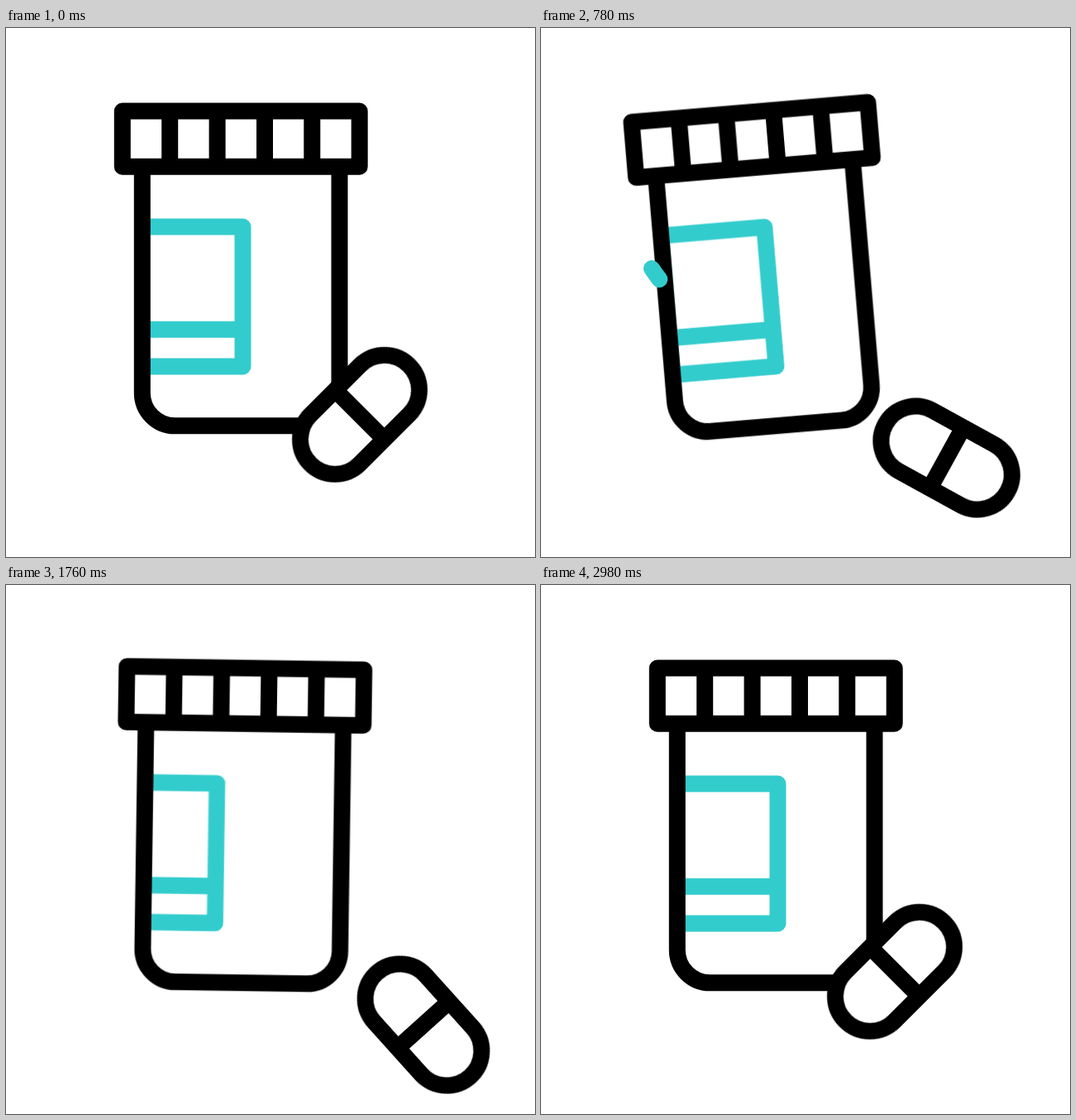
Recreate the animation shown at these times as an HTML page. Size 640 by 640 pixels, loop 3600 ms.

```html
<!DOCTYPE html>
<html lang="en">
<head>
<meta charset="utf-8">
<title>Pill bottle</title>
<style>
  @property --head { syntax: "<number>"; inherits: false; initial-value: 0; }
  @property --tail { syntax: "<number>"; inherits: false; initial-value: 0; }

  html, body { margin: 0; width: 100%; height: 100%; overflow: hidden; background: #fff; }
  svg { display: block; width: 100vw; height: 100vh; }

  .ink, .teal { fill: none; stroke-width: 20; stroke-linejoin: round; }
  .ink { stroke: #000; }
  .teal { stroke: #33cccd; }

  .bottle, .label, .pill, .turn, .swoosh {
    animation: 3600ms cubic-bezier(.37, 0, .63, 1) infinite both;
  }
  .bottle { animation-name: sway; transform-origin: 285px 481px; }
  .label { animation-name: spin; }
  .pill { animation-name: slide; }
  .turn { animation-name: turn; }

  .swoosh {
    stroke-linecap: round;
    stroke-dasharray: calc((var(--head) - var(--tail)) * 1px) 400px;
    stroke-dashoffset: calc(var(--tail) * -1px);
  }
  .front { animation-name: front-head, front-tail, front-show; }
  .low { animation-name: low-head, low-tail, low-show; }

  /* damped rocking on the base */
  @keyframes sway {
    0% { transform: rotate(0deg); }
    15.833% { transform: rotate(-17.8deg); }
    27.5% { transform: rotate(8deg); }
    36.389% { transform: rotate(-4.1deg); }
    43.611% { transform: rotate(2.2deg); }
    52.778%, 100% { transform: rotate(0deg); }
  }

  /* the label backs up, then goes once round the bottle */
  @keyframes spin {
    0% { transform: translateX(0); }
    13.472% { transform: translateX(-58.5px); }
    55.083%, 66.667% { transform: translateX(621px); }
    82.222%, 100% { transform: translateX(620px); }
  }

  @keyframes slide {
    0% { transform: translate(428px, 467.8px); }
    34.167%, 43.722% { transform: translate(516.5px, 541.6px); }
    65.722%, 100% { transform: translate(428px, 467.8px); }
  }
  @keyframes turn {
    0% { transform: rotate(-45deg); }
    38.278%, 40.556% { transform: rotate(77deg); }
    69.25% { transform: rotate(-73deg); }
    82.222%, 100% { transform: rotate(-45deg); }
  }

  @keyframes front-head {
    0%, 19.528% { --head: 0; }
    37.083%, 100% { --head: 100; }
  }
  @keyframes front-tail {
    0%, 25.056% { --tail: 0; }
    42.611%, 100% { --tail: 100; }
  }
  @keyframes front-show {
    0%, 20.3% { visibility: hidden; }
    20.301%, 42.2% { visibility: visible; }
    42.201%, 100% { visibility: hidden; }
  }

  @keyframes low-head {
    0%, 28.056% { --head: 0; }
    39.167%, 100% { --head: 100; }
  }
  @keyframes low-tail {
    0%, 31.389% { --tail: 0; }
    42.5%, 100% { --tail: 100; }
  }
  @keyframes low-show {
    0%, 28.6% { visibility: hidden; }
    28.601%, 42.1% { visibility: visible; }
    42.101%, 100% { visibility: hidden; }
  }
</style>
</head>
<body>
<svg viewBox="0 0 640 640">
  <defs>
    <clipPath id="inside"><rect x="165" y="170" width="238.5" height="310"/></clipPath>
    <path id="tag" d="M160.5 240.5H286.5V409.5H160.5ZM160.5 364.7H286.5"/>
  </defs>

  <g class="bottle">
    <g clip-path="url(#inside)">
      <g class="label teal">
        <use href="#tag"/>
        <use href="#tag" x="-620"/>
      </g>
    </g>
    <path class="ink" d="M164.8 168V441.5A39.5 39.8 0 0 0 204.3 481.3H364A39.5 39.8 0 0 0 403.5 441.5V168"/>
    <path class="ink" d="M140.8 100.5H427.7V167.7H140.8ZM198.2 100V168M255.6 100V168M313 100V168M370.3 100V168"/>
  </g>

  <g class="pill">
    <g class="turn">
      <rect class="ink" style="fill:#fff" x="-84.4" y="-42" width="168.8" height="84" rx="42"/>
      <path class="ink" d="M0 -42V42"/>
    </g>
  </g>

  <path class="swoosh front teal" pathLength="100" d="M134 291C168 341 215 387.5 320 387.5S472 341 506 291"/>
  <path class="swoosh low teal" pathLength="100" d="M314 470C390 476 450 452 492 408"/>
</svg>
</body>
</html>
```
